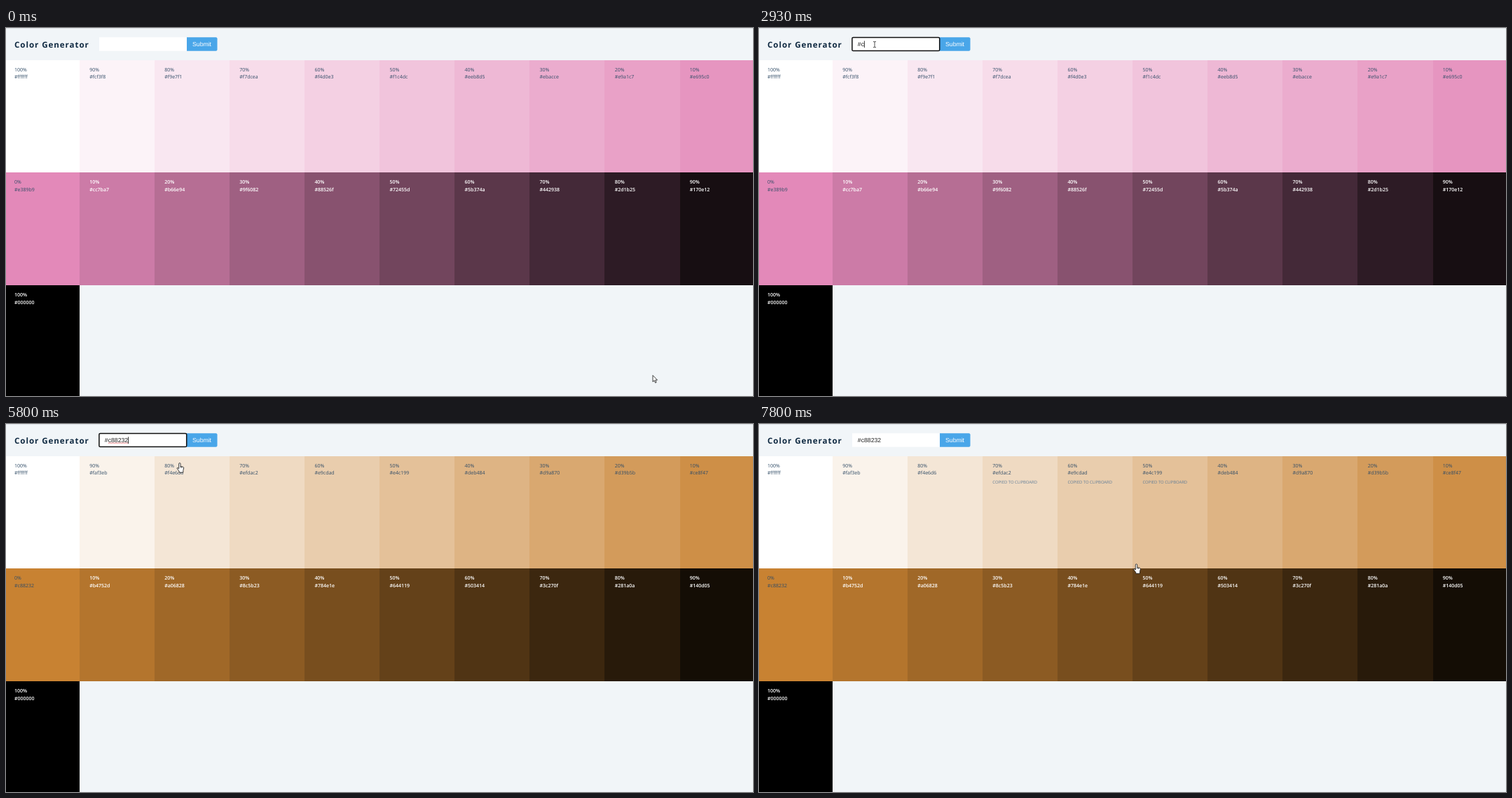
Animation of 1066x525 px, one loop 8 s. Source, as an HTML page:

```html
<!DOCTYPE html>
<html lang="en">
<head>
<meta charset="utf-8">
<title>Color Generator</title>
<style>
  html, body { margin: 0; width: 100%; height: 100%; overflow: hidden; background: #f1f5f8; }
  svg { display: block; width: 1066px; height: 525px; font: 7px "Open Sans", "Noto Sans", sans-serif; text-rendering: geometricPrecision; }
  .cell { shape-rendering: crispEdges; }
  .dark { fill: #324d67; }
  .pale { fill: #fff; font-weight: 600; }
  .note { fill: #617d98; font-size: 5.9px; }
  .title { fill: #102a42; font-size: 11.6px; font-weight: 700; letter-spacing: .93px; }
  .form { font: 8.7px "Liberation Sans", Arial, sans-serif; }
  .cursor { fill: #fff; stroke: #111; stroke-width: .8; stroke-linejoin: round; }
</style>
</head>
<body>
<svg viewBox="0 0 1066 525">
  <rect width="1066" height="1" fill="#dde1e5"/>
  <text class="title" x="12" y="28">Color Generator</text>
  <g id="pink"></g>
  <g id="orange"></g>
  <g id="notes"></g>
  <g class="form">
    <rect x="133" y="13.3" width="125" height="19.4" fill="#fff"/>
    <path d="M258 13.3h41.5q2 0 2 2v15.4q0 2-2 2H258z" fill="#49a6e9"/>
    <text x="266" y="26" fill="#fff">Submit</text>
    <rect id="ring" x="132.9" y="13.5" width="124.8" height="19" rx="1.6" fill="none" stroke="#101010" stroke-width="1.5"/>
    <text id="value" x="140.8" y="26" fill="#222"></text>
    <path id="spelling" d="M146 27.2H174" stroke="#e0393e" stroke-width=".8" stroke-dasharray="1.3 .5"/>
    <path id="caret" d="M0 18.4V28" stroke="#000" stroke-width=".8"/>
  </g>
  <g id="mouse">
    <circle id="click" r="6.5" fill="#ffff3c" fill-opacity=".75"/>
    <path id="arrow" class="cursor" d="M0 0V9.2L2.1 7.3L3.6 10.7L5.1 10L3.7 6.7H6.5Z"/>
    <path id="beam" d="M-2-4.2Q0-4.2 0-3.4Q0-4.2 2-4.2M0-3.6V3.6M-2 4.2Q0 4.2 0 3.4Q0 4.2 2 4.2" fill="none" stroke="#222" stroke-width=".8"/>
    <path id="hand" class="cursor" d="M-1.2 1a1.2 1.2 0 0 1 2.4 0V4.6L4.8 5.4Q6 5.8 5.8 7.2L5 10.5V13.3H-.8V11.5L-3.6 8Q-4.3 6.8-3 6.6L-1.2 8ZM1.2 4.6V6.6M3 5.2V6.9"/>
  </g>
</svg>
<script>
const LOOP = 8000, TICK = 200 / 3, BLINK = 530;
const CELL_W = 107.07, CELL_H = 160.7, LEFT = -2.1, TOP = 45.6;
const FOCUS = 990, SUBMIT = 4790, SPELL = 5520, BLUR = 6500;
const HEX = '#c88232';
const KEYS = [2400, 2930, 3390, 3590, 4000, 4200, 4460];
const CLICKS = [FOCUS, BLUR, 6830, 7300];
const COPIES = [6570, 6900, 7370];

// time, x, y of the pointer's hot spot
const PATH = [
  [0, 923, 495.5], [870, 165, 23.5], [5400, 165, 23.5], [5600, 142, 20],
  [6070, 414, 112], [6220, 395.5, 111], [6570, 395.5, 111], [6800, 493, 122],
  [7060, 493, 122], [7270, 562, 125], [7470, 562, 125], [7800, 538.5, 200], [LOOP, 538.5, 200]
];

const $ = id => document.getElementById(id);
const show = (id, on) => $(id).setAttribute('visibility', on ? 'visible' : 'hidden');
const place = (id, x, y) => $(id).setAttribute('transform', `translate(${x} ${y})`);
const corner = i => [LEFT + i % 10 * CELL_W, TOP + Math.floor(i / 10) * CELL_H];
const label = (i, dy, cls, text) => {
  const [x, y] = corner(i);
  return `<text class="${cls}" x="${x + 14.2}" y="${y + dy}">${text}</text>`;
};

// ten tints down to the base colour, then ten shades
function palette(base) {
  let out = '';
  for (let i = 0; i <= 20; i++) {
    const weight = Math.abs(10 - i) / 10, goal = i < 10 ? 255 : 0;
    const color = '#' + base.map(c => Math.round(c * (1 - weight) + goal * weight)
      .toString(16).padStart(2, '0')).join('');
    const [x, y] = corner(i), cls = i > 10 ? 'pale' : 'dark';
    out += `<rect class="cell" x="${x}" y="${y}" width="${CELL_W}" height="${CELL_H}" fill="${color}"/>`
      + label(i, 15.9, cls, Math.round(weight * 100) + '%') + label(i, 26.7, cls, color);
  }
  return out;
}

function pointer(t) {
  const now = Math.min(LOOP - 1, Math.floor((t + 12) / TICK) * TICK);
  const n = PATH.findIndex(p => p[0] > now);
  const [t0, x0, y0] = PATH[n - 1], [t1, x1, y1] = PATH[n];
  const u = (now - t0) / (t1 - t0), e = u * u * (3 - 2 * u);
  return [x0 + (x1 - x0) * e, y0 + (y1 - y0) * e];
}

function cursorAt(x, y) {
  if (y > 13 && y < 33) {
    if (x > 132 && x < 258) return 'beam';
    if (x >= 258 && x < 302) return 'hand';
  }
  const inCell = y > TOP && (y < TOP + 2 * CELL_H || x < LEFT + CELL_W);
  return inCell ? 'hand' : 'arrow';
}

function draw(t) {
  show('pink', t < SUBMIT);
  show('orange', t >= SUBMIT);
  COPIES.forEach((at, i) => show('note' + i, t >= at));

  const typed = KEYS.filter(k => k <= t).length;
  const focused = t >= FOCUS && t < BLUR;
  const lastKey = typed ? KEYS[typed - 1] : FOCUS;
  $('value').textContent = HEX.slice(0, typed);
  show('ring', focused);
  show('spelling', focused && t >= SPELL);
  show('caret', focused && (t - lastKey) % (2 * BLINK) < BLINK);
  place('caret', 141.2 + (typed ? $('value').getComputedTextLength() : 0), 0);

  const [x, y] = pointer(t), kind = cursorAt(x, y);
  place('mouse', x, y);
  for (const id of ['arrow', 'beam', 'hand']) show(id, id === kind);
  show('click', CLICKS.some(at => t >= at && t < at + 130));
}

$('pink').innerHTML = palette([227, 137, 185]);
$('orange').innerHTML = palette([200, 130, 50]);
$('notes').innerHTML = COPIES.map((_, i) =>
  `<g id="note${i}">${label(i + 3, 39.6, 'note', 'COPIED TO CLIPBOARD')}</g>`).join('');

const start = performance.now();
function frame() {
  draw((performance.now() - start) % LOOP);
  requestAnimationFrame(frame);
}
frame();
</script>
</body>
</html>
```
